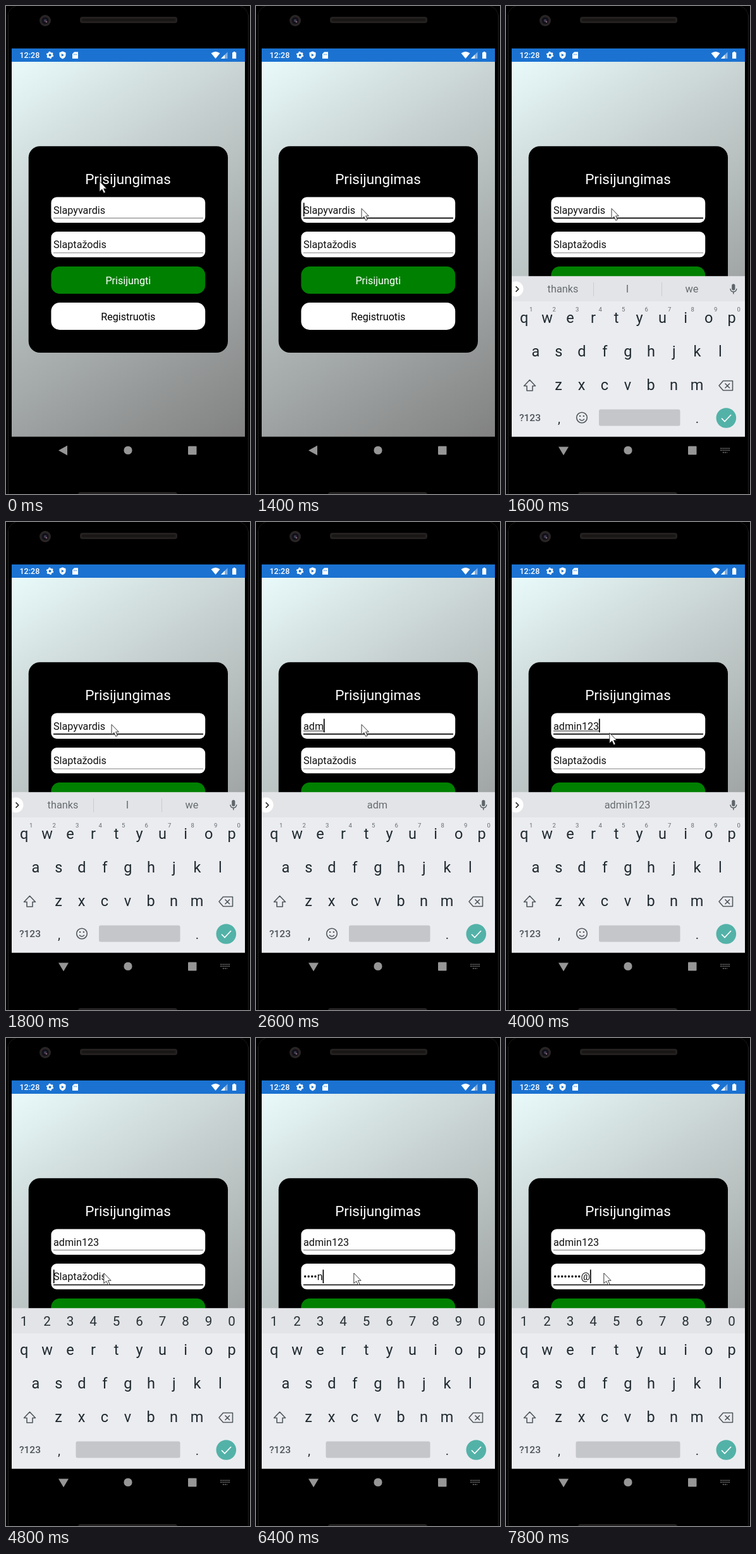
These frames come from a looping animation (386x770 px, 8 s). An HTML page:

```html
<!DOCTYPE html>
<html lang="lt">
<head>
<meta charset="utf-8">
<title>Prisijungimas</title>
<style>
  html, body { margin: 0; width: 100%; height: 100%; overflow: hidden; background: #000; }
  svg { display: block; width: 386px; height: 770px; font: 16.15px Roboto, sans-serif; }
  text { white-space: pre; }
  .mid { text-anchor: middle; }
  .key { font-size: 23.5px; fill: #1f2a30; }
  .num { font-size: 20.5px; fill: #263036; }
  .hint { font-size: 9.5px; fill: #646b70; }
  .sug { font-size: 16.3px; fill: #666c70; }
  .line { fill: none; stroke: #50585d; stroke-width: 1.6; stroke-linejoin: round; }
</style>
</head>
<body>
<svg viewBox="0 0 386 770">
  <defs>
    <linearGradient id="sky" gradientUnits="userSpaceOnUse" x1="9" y1="88" x2="378" y2="680">
      <stop stop-color="#e9fafa"/><stop offset=".3" stop-color="#c8d2d2"/><stop offset="1" stop-color="#818181"/>
    </linearGradient>
    <clipPath id="screen"><path d="M9 67h369v612.6H9z"/></clipPath>
  </defs>

  <!-- phone body -->
  <rect width="386" height="770"/>
  <path d="M3.5 14V770M383.5 14V770" stroke="#1b1b1b" stroke-width="1.5"/>
  <path d="M3 14Q5 4 15 0M383 14Q381 4 371 0" fill="none" stroke="#181818"/>
  <rect x="117" y="17" width="154" height="10" rx="4" fill="#242020"/>
  <rect x="120" y="20" width="148" height="4" rx="2" fill="#191616"/>
  <circle cx="62" cy="23" r="9" fill="#292525"/>
  <circle cx="62" cy="23" r="5.5" fill="#121019"/>
  <circle cx="62" cy="23" r="2.2" fill="#3a3a50"/>
  <circle cx="64" cy="25" r="1.3" fill="#80606a"/>
  <rect x="114" y="767" width="157" height="8" rx="4" fill="#242222"/>

  <!-- screen -->
  <rect x="9" y="88" width="369" height="591.6" fill="url(#sky)"/>
  <rect x="9" y="67" width="369" height="21" fill="#1b72d1"/>
  <g fill="#fff">
    <text x="21.5" y="82.3" font-size="12.5" font-weight="500">12:28</text>
    <circle cx="69.5" cy="77.5" r="3.3" fill="none" stroke="#fff" stroke-width="2.6"/>
    <circle cx="69.5" cy="77.5" r="4.9" fill="none" stroke="#fff" stroke-width="1.6" stroke-dasharray="2.6 2.53"/>
    <path d="M89.5 71.5l5 2v3.5q0 4.5-5 6.5q-5-2-5-6.5v-3.5z"/>
    <path d="M87.8 75l4 2.4l-4 2.4z" fill="#1b72d1"/>
    <path d="M108 72.5h6v10.5h-9v-7.5z"/>
    <path d="M107.5 75.5v2M109.5 75.5v2M111.5 75.5v2" stroke="#1b72d1" stroke-width=".8"/>
    <path d="M324.5 74.5q7-5 14 0l-7 8.5z"/>
    <path d="M350.5 72.5v10.5h-10.5z" opacity=".45"/>
    <path d="M346 77v6h-6z"/>
    <path d="M358 73.3h1.8v-1.3h2.6v1.3h1.8v9.7h-6.2z"/>
  </g>

  <!-- login card -->
  <rect x="35.7" y="221.2" width="315.3" height="325.8" rx="18"/>
  <text class="mid" x="193" y="280.8" font-size="22.4" fill="#fff">Prisijungimas</text>
  <g fill="#fff">
    <rect x="71.4" y="301.4" width="243.8" height="40.6" rx="9"/>
    <rect x="71.4" y="356" width="243.8" height="40.6" rx="9"/>
    <rect x="71.4" y="411" width="243.8" height="43" rx="13.5" fill="#008000"/>
    <rect x="71.4" y="468" width="243.8" height="43" rx="13.5"/>
    <text class="mid" x="193.3" y="438.7">Prisijungti</text>
  </g>
  <text class="mid" x="193.3" y="495.7">Registruotis</text>
  <path id="userLine" d="M75 334.6h237"/>
  <path id="passLine" d="M75 389.5h237"/>
  <text id="user" x="75" y="327.7" fill="#111"></text>
  <text id="pass" x="75" y="382.4" fill="#111"></text>
  <path id="compose" stroke="#222"/>
  <path id="caret" stroke="#000" stroke-width="1.7"/>

  <!-- keyboard -->
  <g id="keyboard" clip-path="url(#screen)">
    <rect x="9" y="426.5" width="369" height="254" fill="#ebecf0"/>
    <rect x="9" y="426.5" width="369" height="39.5" fill="#e3e4e7"/>
    <g id="keys"></g>
    <g id="suggestBar">
      <circle cx="15.5" cy="446.5" r="12" fill="#fff"/>
      <path class="line" d="M15.5 442.5l4.3 4.2l-4.3 4.2" style="stroke:#222"/>
      <rect x="357.2" y="438.5" width="5.2" height="10" rx="2.6" fill="#5f666b"/>
      <path class="line" d="M354.8 446q.5 5 5 5t5-5M359.8 451v3.5" style="stroke-width:1.4"/>
      <path id="dividers" d="M138.5 436v22M246.5 436v22" stroke="#c9cdd0"/>
      <text class="mid sug" x="90" y="452.3"></text>
      <text class="mid sug" x="192" y="452.3"></text>
      <text class="mid sug" x="294" y="452.3"></text>
      <g id="hints"></g>
    </g>
    <g id="numberRow"></g>
    <path class="line" d="M37.5 590l-9 9.5h4.5v7.5h9v-7.5h4.5z"/>
    <path class="line" d="M343.5 591.5h15v15h-15l-6.5-7.5zM346.5 595.5l7.5 7.5M354 595.5l-7.5 7.5"/>
    <text class="mid" x="38" y="655" font-size="15.5" font-weight="500" fill="#4d555a">?123</text>
    <text class="mid num" x="84" y="657.5">,</text>
    <text class="mid num" x="302.5" y="657.5">.</text>
    <g id="emoji">
      <circle class="line" cx="120" cy="649.5" r="8.3"/>
      <path class="line" d="M116 651.8q4 4.4 8 0"/>
      <path d="M116 647h2.2M121.8 647h2.2" stroke="#50585d" stroke-width="2.2"/>
    </g>
    <rect id="space" y="636.5" height="26" rx="2.5" fill="#c4c6c9"/>
    <circle cx="348.3" cy="650" r="15.8" fill="#53b2a8"/>
    <path d="M341 650.5l5 5l10-10.5" fill="none" stroke="#fff" stroke-width="1.7"/>
  </g>

  <!-- navigation bar -->
  <g fill="#969696">
    <path id="back"/>
    <circle cx="193" cy="701" r="6.6"/>
    <rect x="288" y="694.5" width="13.5" height="13.5" rx="1"/>
    <path id="imeIcon" d="M339.5 698h14M339.5 701h14M343 704.5h7" stroke="#969696" stroke-width="1.6" stroke-dasharray="1.6 1.5"/>
  </g>

  <path id="mouse" d="M0 0V16.2L3.9 12.7L6.7 18.8L9.3 17.6L6.6 11.7H11.3Z" fill="#fff" stroke="#222" stroke-width=".9"/>
</svg>
<script>
const LOOP = 8000, STEP = 200;
const $ = id => document.getElementById(id);
const suggestions = document.querySelectorAll('.sug');
const userName = 'admin123', password = 'admin123@';
const userTimes = [2200, 2400, 2600, 2800, 3000, 3200, 3400, 3600];
const passTimes = [5600, 5800, 6000, 6200, 6400, 6800, 7000, 7200, 7600];
const OPEN = 1600, SWITCH = 4600;

function addRow(group, chars, x, y, cls) {
  [...chars].forEach((char, i) => {
    const el = document.createElementNS('http://www.w3.org/2000/svg', 'text');
    el.setAttribute('class', 'mid ' + cls);
    el.setAttribute('x', x + i * 36.5);
    el.setAttribute('y', y);
    el.textContent = char;
    $(group).append(el);
  });
}
addRow('keys', 'qwertyuiop', 28.6, 500, 'key');
addRow('keys', 'asdfghjkl', 46.9, 552.7, 'key');
addRow('keys', 'zxcvbnm', 83, 606, 'key');
addRow('hints', '1234567890', 39.7, 482, 'hint');
addRow('numberRow', '1234567890', 28.6, 454.3, 'num');

const show = (id, on) => $(id).setAttribute('visibility', on ? 'inherit' : 'hidden');
const countTyped = (times, t) => times.filter(at => at <= t).length;

function glide(t, start, end, from, to) {
  const p = Math.min(1, Math.max(0, (t - start) / (end - start)));
  const eased = p * p * (3 - 2 * p);
  return from.map((v, i) => v + (to[i] - v) * eased);
}

function setLine(id, focused) {
  $(id).setAttribute('stroke', focused ? '#000' : '#8c8c8c');
  $(id).setAttribute('stroke-width', focused ? 1.7 : 1.1);
}

function render(t) {
  const typed = userName.slice(0, countTyped(userTimes, t));
  const count = countTyped(passTimes, t);
  const inPass = t >= SWITCH, inUser = t >= 1200 && !inPass, open = t >= OPEN;

  $('user').textContent = typed || 'Slapyvardis';
  $('pass').textContent = count ? '•'.repeat(count - 1) + password[count - 1] : 'Slaptažodis';
  setLine('userLine', inUser);
  setLine('passLine', inPass);

  const filled = inPass ? count : typed.length;
  const width = filled ? $(inPass ? 'pass' : 'user').getComputedTextLength() : 0;
  $('caret').setAttribute('d', `M${75.7 + width} ${inPass ? 365.5 : 310.5}v21.5`);
  const blinkOn = t < OPEN || t >= 2200 && t < 4200 || t >= SWITCH && t < 5200 || t >= 5400;
  show('caret', (inUser || inPass) && blinkOn);
  $('compose').setAttribute('d', `M75 329.8h${width}`);
  show('compose', inUser && filled > 0);

  show('keyboard', open);
  show('imeIcon', open);
  show('suggestBar', !inPass);
  show('emoji', !inPass);
  show('numberRow', inPass);
  show('dividers', !inPass && !typed && open);
  const words = typed ? ['', typed, ''] : ['thanks', 'I', 'we'];
  suggestions.forEach((el, i) => el.textContent = words[i]);
  $('space').setAttribute('x', inPass ? 110.5 : 147);
  $('space').setAttribute('width', inPass ? 165 : 128.5);
  $('back').setAttribute('d', open ? 'M83 695.5h16l-8 13.5z' : 'M97 693.5v15.5l-14-7.7z');

  const [x, y] = t < 3800
    ? glide(t, 400, 1000, [148, 276.5], [167, 319.5])
    : glide(t, 3800, 4400, [167, 319.5], [154.8, 371]);
  $('mouse').setAttribute('transform', `translate(${x} ${y})`);
}

function tick() {
  const t = performance.now() % LOOP;
  render(Math.floor(t / STEP) * STEP);
  requestAnimationFrame(tick);
}
tick();
</script>
</body>
</html>
```
